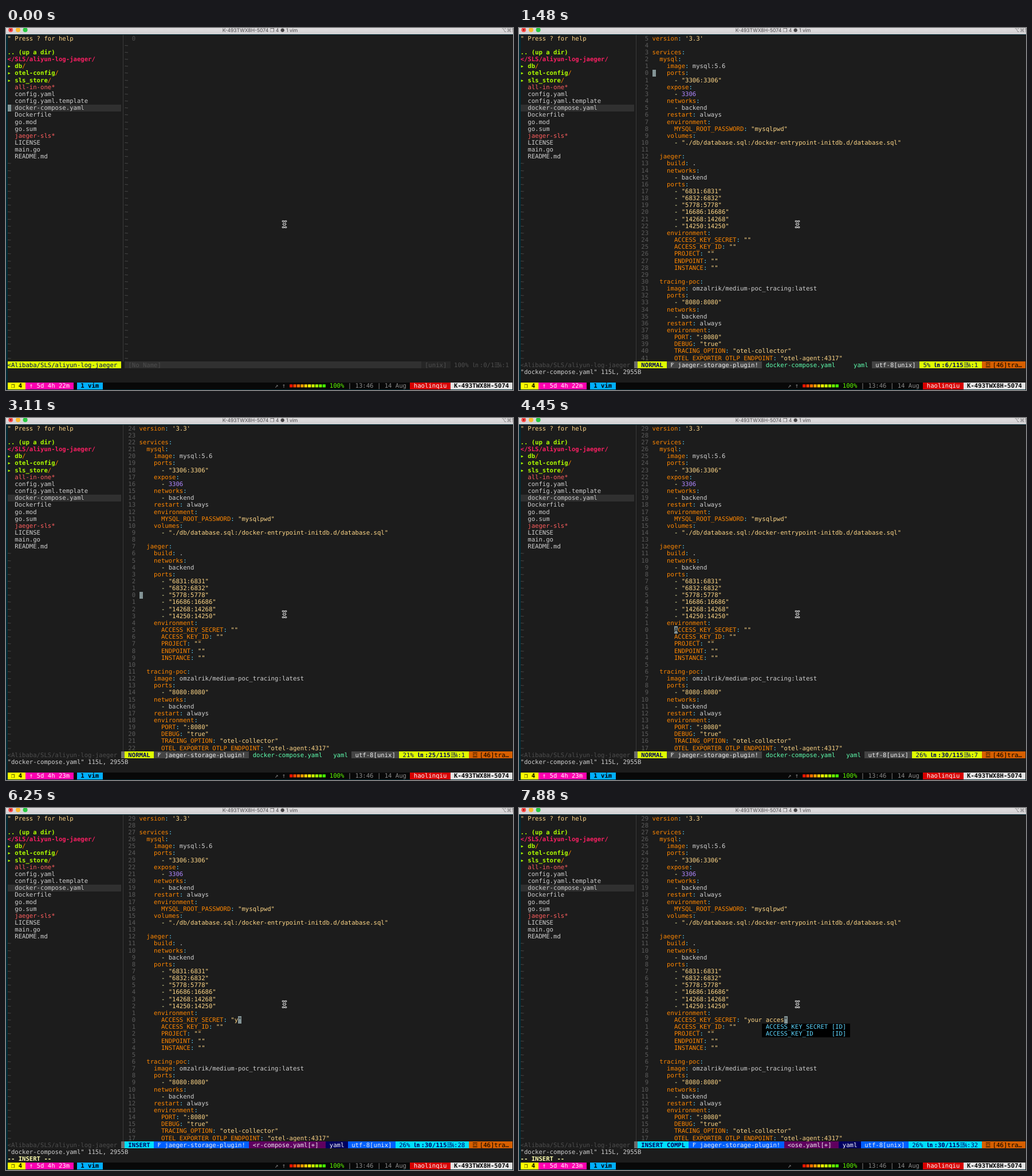
Recreate the animation shown at these times as an HTML page with a canvas. Size 885 by 633 pixels, loop 8000 ms.

```html
<!DOCTYPE html>
<html lang="en">
<head>
<meta charset="utf-8">
<title>Terminal</title>
<style>
  html, body { margin: 0; width: 100%; height: 100%; overflow: hidden; background: #002b36; }
  canvas { display: block; }
</style>
</head>
<body>
<canvas id="stage" width="885" height="633"></canvas>
<script>
const ctx = document.getElementById('stage').getContext('2d');
const LOOP = 8000;
const X0 = 2.5, Y0 = 12.1, CW = 6.39, RH = 12.15;
const MONO = '10.61px "DejaVu Sans Mono", "DejaVu Sans", "Noto Sans CJK SC", monospace';
const UI = '8.6px Inter, "DejaVu Sans", sans-serif';

const BG = '#1c1c1c', TEXT = '#d0d0d0', DIM = '#4e4e4e', NUM = '#5c5c5c', LIME = '#afff00',
  ORANGE = '#ff8700', RED = '#ff5f5f', PINK = '#fb1f63', STR = '#ffd787', CYAN = '#5fd7ff',
  VIOLET = '#af87ff', CREAM = '#ffffaf', NAVY = '#00005f', BLOCK = '#839496';

const HOST = 'K-493TWX8H-5074', USER = 'haolinqiu';

const FILES = ['all-in-one*', 'config.yaml', 'config.yaml.template', 'docker-compose.yaml', 'Dockerfile',
  'go.mod', 'go.sum', 'jaeger-sls*', 'LICENSE', 'main.go', 'README.md'];

const YAML = `version: '3.3'

services:
  mysql:
    image: mysql:5.6
    ports:
      - "3306:3306"
    expose:
      - 3306
    networks:
      - backend
    restart: always
    environment:
      MYSQL_ROOT_PASSWORD: "mysqlpwd"
    volumes:
      - "./db/database.sql:/docker-entrypoint-initdb.d/database.sql"

  jaeger:
    build: .
    networks:
      - backend
    ports:
      - "6831:6831"
      - "6832:6832"
      - "5778:5778"
      - "16686:16686"
      - "14268:14268"
      - "14250:14250"
    environment:
      ACCESS_KEY_SECRET: ""
      ACCESS_KEY_ID: ""
      PROJECT: ""
      ENDPOINT: ""
      INSTANCE: ""

  tracing-poc:
    image: omzalrik/medium-poc_tracing:latest
    ports:
      - "8080:8080"
    networks:
      - backend
    restart: always
    environment:
      PORT: ":8080"
      DEBUG: "true"
      TRACING_OPTION: "otel-collector"
      OTEL_EXPORTER_OTLP_ENDPOINT: "otel-agent:4317"`.split('\n');

const SECRET_ROW = 29;
const FULL_MENU = ['ACCESS_KEY_ID', 'ACCESS_KEY_SECRET', 'JAEGER_COLLECTOR_URL', 'backend', 'tracing',
  'INSTANCE', 'TRACING_OPTION', 'poc_tracing'];
const SHORT_MENU = ['ACCESS_KEY_SECRET', 'ACCESS_KEY_ID'];

// Timelines: [start in ms, value]
const LINE = [[0, 1], [590, 2], [740, 3], [1190, 4], [1340, 5], [1480, 6], [1630, 7], [1780, 9], [1930, 11],
  [2070, 13], [2220, 15], [2370, 17], [2520, 19], [2670, 21], [2810, 23], [2960, 24], [3110, 25],
  [3260, 26], [3410, 27], [3700, 28], [3850, 29], [4000, 30]];
const COLUMN = [[0, 1], [4450, 7], [4600, 24], [4900, 26], [5350, 27]];
const TYPED = [[0, ''], [6250, 'y'], [6400, 'yo'], [6540, 'you'], [6690, 'your '], [6990, 'your a'],
  [7280, 'your ac'], [7430, 'your acc'], [7580, 'your acce'], [7880, 'your acces']];
const MODE = [[0, 'TREE'], [140, 'NORMAL'], [5650, 'INSERT'], [7430, 'INSERT COMPL']];

const at = (steps, t) => steps.reduce((v, [ms, x]) => (t >= ms ? x : v), null);
const colX = c => X0 + c * CW;
const rowY = r => Y0 + r * RH;

function rect(x, y, w, h, color) {
  ctx.fillStyle = color;
  ctx.fillRect(x, y, w, h);
}

function cells(row, col, count, color, rows = 1) {
  const x = Math.round(colX(col)), y = Math.round(rowY(row));
  rect(x, y, Math.round(colX(col + count)) - x, Math.round(rowY(row + rows)) - y, color);
}

// Writes text on the cell grid and returns the next free column.
function put(row, col, text, fg, bg, bold) {
  if (bg) cells(row, col, text.length, bg);
  ctx.font = (bold ? 'bold ' : '') + MONO;
  ctx.fillStyle = fg;
  for (const ch of text) {
    if (ch !== ' ') ctx.fillText(ch, colX(col), rowY(row) + 9.6);
    col++;
  }
  return col;
}

function titleBar() {
  const shade = ctx.createLinearGradient(0, 0, 0, 11);
  shade.addColorStop(0, '#e0dee0');
  shade.addColorStop(1, '#d2d0d2');
  rect(0, 0, 885, 11, shade);
  const dot = (x, r, color) => {
    ctx.fillStyle = color;
    ctx.beginPath();
    ctx.arc(x, 3.3, r, 0, 7);
    ctx.fill();
  };
  dot(8.2, 4, '#fc4a48');
  dot(8.2, 1.2, '#7a0b0b');
  dot(21, 4, '#fdbc2e');
  dot(33.6, 4, '#28c840');
  ctx.font = UI;
  ctx.fillStyle = '#484648';
  ctx.textAlign = 'center';
  ctx.fillText(HOST + ' ❐ 4 ● 1 vim', 443.5, 6.6);
  ctx.textAlign = 'right';
  ctx.fillStyle = '#777577';
  ctx.fillText('⌥⌘1', 886, 6.6);
  ctx.textAlign = 'left';
}

function sidebar(active) {
  put(0, 0, '" Press ? for help', STR);
  put(2, 0, '.. (up a dir)', LIME, null, true);
  put(3, 0, '</SLS/aliyun-log-jaeger/', PINK, null, true);
  ['db', 'otel-config', 'sls_store'].forEach((dir, i) => {
    put(4 + i, 0, '▸', LIME);
    put(4 + i, put(4 + i, 2, dir, LIME, null, true), '/', ORANGE);
  });
  cells(10, 0, 31, '#303030');
  FILES.forEach((name, i) => put(7 + i, 2, name, name.endsWith('*') ? RED : TEXT));
  for (let r = 18; r < 47; r++) put(r, 0, '~', DIM);
  rect(204, Y0, 1, 47 * RH, '#3a3a3a');
  if (active) cells(10, 0, 1, BLOCK);
  const path = '<Alibaba/SLS/aliyun-log-jaeger ';
  put(47, 0, path, active ? NAVY : DIM, active ? '#dfff00' : BG);
}

function emptyPane() {
  put(0, 34, '0', DIM);
  for (let r = 1; r < 47; r++) put(r, 32, '~', DIM);
  cells(47, 32, 81, '#303030');
  put(47, 33, '[No Name]', DIM);
  put(47, 113, ' [unix] ', DIM, '#262626');
  put(47, 121, ' 100% ㏑ :0/1☰℅:1', DIM);
}

function yamlLine(row, line) {
  const [, indent, dash = '', key = '', colon = '', value] =
    line.match(/^( *)(- )?(?:([\w-]+)(:))?(.*)$/);
  const v = value.trim();
  const color = /^["']/.test(v) ? STR : /^\d+$/.test(v) ? VIOLET : TEXT;
  let c = 36 + indent.length;
  c = put(row, c, dash, CREAM);
  c = put(row, c, key, ORANGE);
  c = put(row, c, colon, CYAN);
  put(row, c, value, color);
}

function branchIcon(col) {
  const x = colX(col) + 1.5, y = rowY(47);
  ctx.strokeStyle = '#eeeeee';
  ctx.lineWidth = 1;
  ctx.beginPath();
  ctx.moveTo(x, y + 9.6);
  ctx.lineTo(x, y + 2);
  ctx.moveTo(x, y + 4.2);
  ctx.lineTo(x + 2.6, y + 2);
  ctx.moveTo(x, y + 7);
  ctx.lineTo(x + 4.4, y + 2.8);
  ctx.stroke();
}

function statusLine(s) {
  const insert = s.mode !== 'NORMAL', dirty = s.typed !== '';
  const main = insert ? '#00dfff' : '#dfff00';
  const mid = insert ? '#005fff' : '#444444';
  const base = insert ? NAVY : BG;
  const baseText = insert ? '#ffffff' : '#5fffaf';

  cells(47, 31, 1, '#6c6c6c');
  let left = put(47, 32, ` ${s.mode} `, NAVY, main, true);
  branchIcon(left + 1);
  const icon = left + 1;
  left = put(47, left, '   jaeger-storage-plugin! ', '#eeeeee', mid);
  branchIcon(icon);

  put(47, 126, ' ☲ [46]tra… ', '#000000', '#d75f00');
  const pct = ` ${Math.floor(s.line / 115 * 100)}% `;
  const pos = `㏑ :${s.line}/115☰`;
  const tail = `℅:${s.mode === 'INSERT COMPL' ? 32 : s.col} `;
  let right = 126 - (pct + pos + tail).length;
  const next = put(47, right, pct, NAVY, main);
  cells(47, next, (pos + tail).length, main);
  put(47, put(47, next, pos, NAVY, null, true), tail, NAVY);
  put(47, right -= 13, ' utf-8[unix] ', '#eeeeee', mid);
  put(47, right -= 6, ' yaml ', baseText, base);

  let name = 'docker-compose.yaml' + (dirty ? '[+]' : '');
  const room = right - left - 3;
  if (name.length > room) name = '<' + name.slice(1 - room);
  cells(47, left, right - left, dirty ? '#5f005f' : base);
  put(47, left + 1, name, dirty ? '#eeeeee' : baseText);

  put(48, 0, '"docker-compose.yaml" 115L, 2955B', TEXT);
  if (insert) put(49, 0, '-- INSERT --', CREAM, null, true);
}

function menu(items) {
  const width = Math.max(...items.map(w => w.length));
  items.forEach((word, i) => put(30 + i, 66, ` ${word.padEnd(width)} [ID] `, CYAN, '#000000'));
}

function editor(s) {
  YAML.forEach((line, r) => {
    const n = String(Math.abs(r + 1 - s.line));
    put(r, 35 - n.length, n, NUM);
    if (r === SECRET_ROW) line = line.replace('""', `"${s.typed}"`);
    yamlLine(r, line);
    if (r === s.line - 1) put(r, 35 + s.col, line[s.col - 1] || ' ', BG, BLOCK);
  });
  if (s.menu) menu(s.menu);
  statusLine(s);
}

function tmuxBar(s) {
  const r = 50, grey = '#8a8a8a';
  cells(r, 0, 138.2, '#080808');
  put(r, 0, ' ❐ 4 ', '#000000', '#ffff00', true);
  put(r, 5, ` ↑ 5d 4h ${s.minute}m `, '#ffffff', '#ff00af');
  put(r, 19, ' 1 vim ', '#000000', '#00afff', true);
  put(r, 73, s.upload ? '↗ ↑' : '↗', grey);
  for (let i = 0; i < 10; i++) {
    rect(colX(77 + i) + 0.6, rowY(r) + 3.6, 5.2, 5.2, `hsl(${5 + i * 11}, 100%, 50%)`);
  }
  put(r, 88, '100%', '#5fff00');
  put(r, 93, '| 13:46 | 14 Aug', grey);
  put(r, 110, ` ${USER} `, '#ffffff', '#d70000');
  put(r, 121, ` ${HOST} `, '#000000', '#e4e4e4', true);
}

function pointer() {
  const shape = new Path2D('M483 338 Q486 338 486 340.5 Q486 338 489 338 M486 340 V346 ' +
    'M483 348.5 Q486 348.5 486 346 Q486 348.5 489 348.5 M484 343.2 H488');
  ctx.lineCap = 'round';
  for (const [w, color] of [[2.8, '#e8e8e8'], [1, '#111111']]) {
    ctx.lineWidth = w;
    ctx.strokeStyle = color;
    ctx.stroke(shape);
  }
  ctx.lineCap = 'butt';
}

function stateAt(t) {
  const typed = at(TYPED, t);
  return {
    mode: at(MODE, t),
    line: at(LINE, t),
    col: at(COLUMN, t) + typed.length,
    typed,
    menu: at([[0, null], [7280, FULL_MENU], [7430, SHORT_MENU]], t),
    minute: t < 2370 ? 22 : 23,
    upload: t < 7880
  };
}

function draw(s) {
  ctx.textRendering = 'geometricPrecision';
  rect(0, 0, 885, 633, '#002b36');
  cells(0, 0, 138.2, BG, 50);
  titleBar();
  sidebar(s.mode === 'TREE');
  if (s.mode === 'TREE') emptyPane();
  else editor(s);
  tmuxBar(s);
  pointer();
}

let shown = '';
function tick(now) {
  const s = stateAt(now % LOOP), key = JSON.stringify(s);
  if (key !== shown) {
    draw(s);
    shown = key;
  }
  requestAnimationFrame(tick);
}
tick(performance.now());
</script>
</body>
</html>
```
